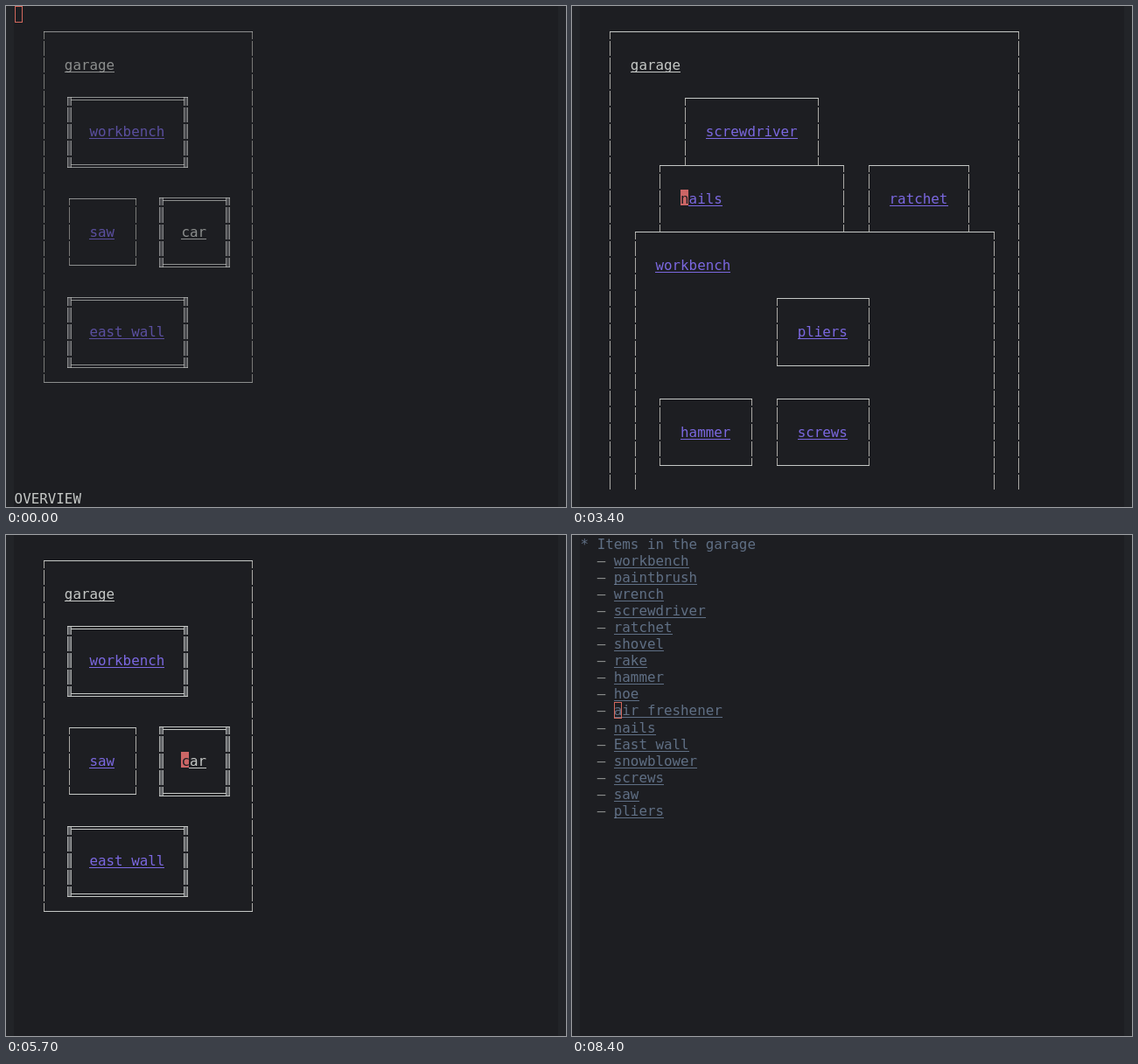
An HTML page with a canvas that plays this animation: 640x573 px, repeating every 9.4 s.

```html
<!DOCTYPE html>
<html lang="en">
<head>
<meta charset="utf-8">
<style>
html, body { margin: 0; width: 100%; height: 100%; overflow: hidden; background: #1d1e22; }
canvas { display: block; }
</style>
</head>
<body>
<canvas id="stage" width="640" height="573"></canvas>
<script>
const g = document.getElementById('stage').getContext('2d');
const LOOP = 9400, CW = 9.54, RH = 19.08, LAST_ROW = 28;
const BG = '#1d1e22', FG = '#c5c8c6', LINK = '#7b68e0', BLUE = '#8299b8', RED = '#cc6666';
const ITEMS = ['workbench', 'paintbrush', 'wrench', 'screwdriver', 'ratchet', 'shovel', 'rake',
  'hammer', 'hoe', 'air freshener', 'nails', 'East wall', 'snowblower', 'screws', 'saw', 'pliers'];

const left = c => 9.6 + c * CW;
const topOf = r => 0.5 + r * RH;
const midX = c => Math.round(left(c + 0.5));
const midY = r => Math.round(topOf(r + 0.5));
let cursor, filled;

function rect(color, x, y, w, h) {
  g.fillStyle = color;
  g.fillRect(x, y, w, h);
}

function put(text, c, r, color, underline) {
  const y = Math.round(topOf(r) + 15.2);
  const x = Math.round(left(c)), w = Math.round(text.length * CW);
  const active = filled && cursor[0] === c && cursor[1] === r;
  if (underline) {
    rect(color, x, y + 2, w, 1);
    if (active) rect(BG, x, y + 2, 9, 1);
  }
  [...text].forEach((ch, i) => {
    g.fillStyle = active && i === 0 ? BG : color;
    g.fillText(ch, left(c + i), y);
  });
}

function wall(c, r0, r1, double, open) {
  const x = midX(c);
  for (let r = r0; r <= Math.min(r1, LAST_ROW); r++) {
    const a = r === r0 ? midY(r) - (double ? 1 : 0) : Math.round(topOf(r)) + 1;
    const b = r === r1 ? midY(r) + (double && !open ? 3 : 0) : Math.round(topOf(r + 1)) - 1;
    if (double) {
      rect('#65676a', x - 2, a, 5, b - a);
      rect('#a4a6a6', x - 2, a, 1, b - a);
      rect('#a4a6a6', x + 2, a, 1, b - a);
    } else rect('#aaa9a5', x, a, 1, b - a);
  }
}

function edge(c0, c1, r, double, bottom) {
  if (r > LAST_ROW) return;
  const x = midX(c0), w = midX(c1) - x + 1, y = midY(r);
  if (double) {
    const [outer, inner] = bottom ? [y + 2, y - 1] : [y - 1, y + 2];
    rect(BG, x + 3, y - 1, w - 6, 4);
    rect(FG, x - 2, outer, w + 4, 1);
    rect(FG, x + 2, inner, w - 4, 1);
  } else rect(FG, x, y, w, 1);
}

// A labelled frame; by default it fits its label. An open one stands on the frame below.
function box(label, c, r, { c1 = c + label.length + 5, r1 = r + 4, double, open, color = LINK } = {}) {
  wall(c, r, r1, double, open);
  wall(c1, r, r1, double, open);
  edge(c, c1, r, double);
  if (!open) edge(c, c1, r1, double, true);
  put(label, c + 3, r + 2, color, true);
}

function garage(carOpen) {
  const shift = carOpen ? 5 : 0;
  box('garage', 3, 1, { c1: carOpen ? 44 : 28, r1: 22 + shift, color: FG });
  box('workbench', 6, 5, { double: true });
  box('saw', 6, 11);
  if (carOpen) {
    box('car', 17, 11, { c1: 41, r1: 20, color: FG });
    box('air freshener', 20, 15);
  } else box('car', 17, 11, { double: true, color: FG });
  box('east wall', 6, 17 + shift, { double: true });
}

function bench(nailsOpen) {
  const d = nailsOpen ? 4 : 0, right = nailsOpen ? 49 : 41;
  box('garage', 3, 1, { c1: right + 3, r1: 99, color: FG });
  if (nailsOpen) box('screwdriver', 12, 5, { open: true });
  box('nails', 9, 5 + d, { c1: nailsOpen ? 31 : 19, double: !nailsOpen, open: true });
  box('ratchet', nailsOpen ? 34 : 22, 5 + d, { open: true });
  box('workbench', 6, 9 + d, { c1: right, r1: 99 });
  box('pliers', 23, 13 + d);
  box('hammer', 9, 19 + d);
  box('screws', 23, 19 + d);
  box('wrench', 9, 25 + d);
  box('paintbrush', 23, 25 + d);
}

function list() {
  put('* Items in the garage', 0, 0, BLUE);
  ITEMS.forEach((item, i) => {
    put('–', 2, i + 1, FG);
    put(item, 4, i + 1, BLUE, true);
  });
}

const closed = () => garage(false), car = () => garage(true);
const open = () => bench(false), nails = () => bench(true);

// start time, view, cursor column, cursor row, unfocused
const SCENES = [
  [0, closed, 0, 0, true],
  [600, closed, 0, 0],
  [1100, closed, 6, 3],
  [1400, closed, 9, 7],
  [1800, open, 9, 11],
  [2500, open, 12, 7],
  [3400, nails, 12, 11],
  [4300, open, 12, 7],
  [4700, open, 9, 11],
  [4900, closed, 9, 7],
  [5300, closed, 9, 13],
  [5700, closed, 20, 13],
  [6000, car, 20, 13],
  [6500, car, 23, 17],
  [7200, list, 4, 10],
  [8200, list, 4, 10, true]
];

function draw(now) {
  const t = now % LOOP;
  const [, view, c, r, dim] = SCENES.findLast(s => s[0] <= t);
  cursor = [c, r];
  filled = !dim;
  g.font = '15.85px "DejaVu Sans Mono", monospace';

  rect('#222428', 0, 0, 640, 573);
  rect(BG, 9, 0, 622, 573);
  const x = Math.round(left(c)), y = Math.floor(topOf(r));
  if (filled) rect(RED, x, y, 9, 19);
  g.globalAlpha = dim ? 0.66 : 1;
  view();
  g.globalAlpha = 1;
  if (dim) {
    g.strokeStyle = '#d4695e';
    g.lineWidth = 1;
    g.strokeRect(x + 0.5, y + 0.5, 8, 18);
  }
  if (t < 1100) put('OVERVIEW', 0, 29, FG);
  requestAnimationFrame(draw);
}
requestAnimationFrame(draw);
</script>
</body>
</html>
```
